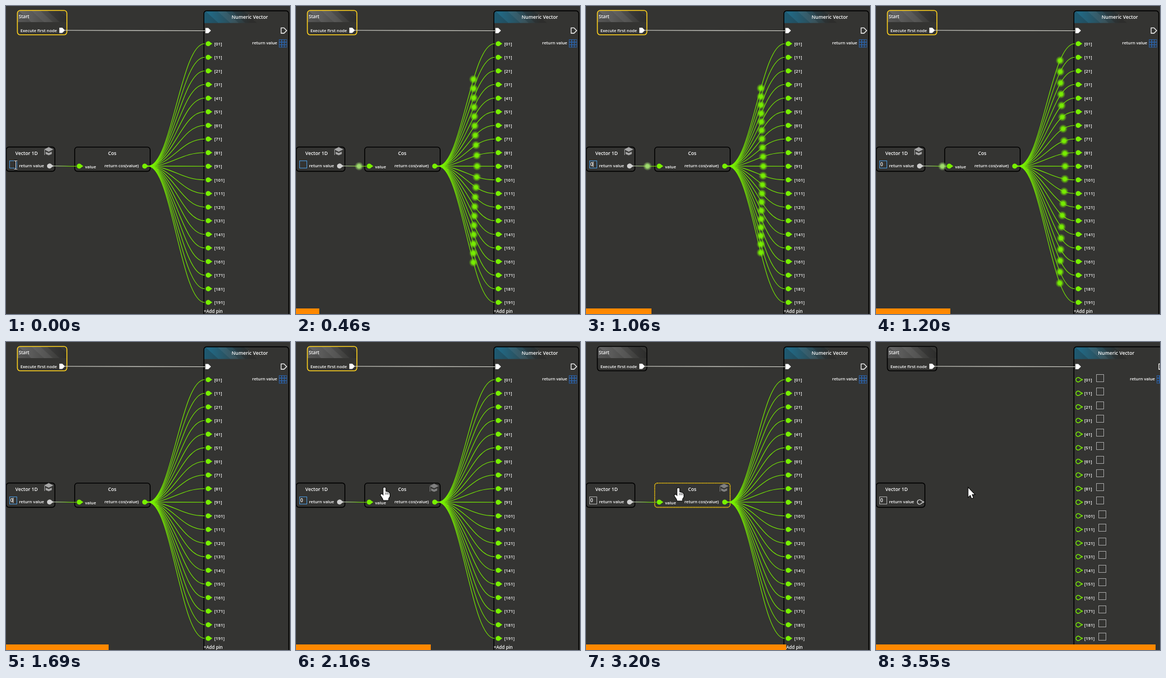
Write an HTML page with a canvas that moves like this. It is 512 by 554 pixels and loops after 3630 ms.

```html
<!DOCTYPE html>
<html lang="en">
<head>
<meta charset="utf-8">
<title>Node graph</title>
<style>
  html, body { margin: 0; width: 100%; height: 100%; overflow: hidden; background: #343432; }
  canvas { display: block; width: 512px; height: 554px; }
</style>
</head>
<body>
<canvas id="stage" width="512" height="554"></canvas>
<script>
const ctx = document.getElementById('stage').getContext('2d');
const LOOP = 3630, BG = '#343432', GREEN = '#78f000', YELLOW = '#ffd21e', WHITE = '#fff';
const ROWS = 20, DELETE_AT = 3240, CLICK_AT = 2600, TYPE_AT = 540;

const KEYS = [[0, 0], [1, 80], [7, 540], [8, 620], [11, 840], [12, 900], [15, 1120], [16, 1200],
  [17, 1280], [22, 1690], [23, 1720], [24, 1800], [29, 2160], [30, 2240], [31, 2300], [32, 2380],
  [39, 2900], [40, 2980], [47, 3490], [48, 3550]];
const ticks = [];
KEYS.forEach(([i, ms], k) => {
  const [j, end] = KEYS[k + 1] || [i + 1, LOOP];
  for (let n = i; n < j; n++) ticks.push(ms + (end - ms) * (n - i) / (j - i));
});

// Wires
const rowY = i => 67.8 + i * 24.49;
function wire(x1, y1, x2, y2) {
  const c = (x2 - x1) * 0.42;
  const d = `M${x1} ${y1}C${x1 + c} ${y1} ${x2 - c} ${y2} ${x2} ${y2}`;
  const el = document.createElementNS('http://www.w3.org/2000/svg', 'path');
  el.setAttribute('d', d);
  const length = el.getTotalLength();
  return { shape: new Path2D(d), at: p => el.getPointAtLength(p * length) };
}
const fan = Array.from({ length: ROWS }, (_, i) => wire(256, 288, 358, rowY(i)));
const feed = wire(84, 287.7, 127, 288.3);
const execWire = wire(106, 43.7, 359, 44.5);
const feedColor = ctx.createLinearGradient(84, 0, 116, 0);
feedColor.addColorStop(0, '#d4d4d4');
feedColor.addColorStop(1, GREEN);

function stroke(shape, color, width = 1.1) {
  ctx.strokeStyle = color;
  ctx.lineWidth = width;
  ctx.stroke(shape);
}

function text(s, x, y, size = 7.6, align = 'left') {
  ctx.font = `600 ${size}px "Open Sans", "Noto Sans", sans-serif`;
  ctx.textAlign = align;
  ctx.fillStyle = WHITE;
  ctx.fillText(s, x, y);
}

const title = (s, x, y) => text(s, x, y, 8.7, 'center');

function poly(points, x = 0, y = 0) {
  const p = new Path2D();
  points.forEach(([a, b]) => p.lineTo(x + a, y + b));
  p.closePath();
  return p;
}

function fill(shape, color) {
  ctx.fillStyle = color;
  ctx.fill(shape);
}

function node(x, y, w, h, border, { header, dotted } = {}) {
  const box = new Path2D();
  box.roundRect(x, y, w, h, 5);
  fill(box, BG);
  if (header) {
    ctx.save();
    ctx.clip(box);
    const { color, reach, height } = header;
    const g = ctx.createLinearGradient(x, 0, x + reach, 0);
    g.addColorStop(0, color);
    g.addColorStop(1, BG);
    ctx.fillStyle = g;
    ctx.fillRect(x, y, reach, height);
    const band = (a, b, shade) =>
      fill(poly([[a, 0], [b, 0], [b + height * 1.1, height], [a + height * 1.1, height]], x, y), shade);
    band(-30, 2, 'rgba(30,30,30,.25)');
    band(reach * 0.28, reach * 0.46, 'rgba(255,255,255,.06)');
    band(reach * 0.6, reach * 0.85, 'rgba(25,25,25,.25)');
    ctx.restore();
  }
  stroke(box, dotted ? '#5a4c12' : border, 1.6);
  if (dotted) {
    ctx.setLineDash([1.4, 1]);
    stroke(box, border, 1.6);
    ctx.setLineDash([]);
  }
}

function pin(x, y, color, hollow) {
  const p = new Path2D();
  p.arc(x, y, hollow ? 4 : 4.5, 0.6, -0.6);
  p.lineTo(x + 7.5, y);
  p.closePath();
  if (hollow) stroke(p, color, 1.5);
  else fill(p, color);
}

function execPin(x, y, hollow) {
  const p = poly([[0, -4.8], [5.2, -4.8], [10, 0], [5.2, 4.8], [0, 4.8]], x, y);
  if (hollow) stroke(p, WHITE, 1.3);
  else fill(p, WHITE);
}

function cap(x, y, color) {
  fill(poly([[-5.5, 1], [0, 3.6], [5.5, 1], [5.5, 5.2], [0, 7.5], [-5.5, 5.2]], x, y), color);
  const top = poly([[-9, -3], [0, -7.5], [9, -3], [0, 1.6]], x, y);
  fill(top, color);
  stroke(top, '#2c2c2c', 0.6);
  ctx.fillStyle = color;
  ctx.fillRect(x - 8, y - 2, 1, 9);
}

function dot({ x, y }, rgb) {
  const g = ctx.createRadialGradient(x, y, 0, x, y, 8);
  [[0, 1], [0.4, 0.95], [0.65, 0.5], [1, 0]].forEach(([at, a]) => g.addColorStop(at, `rgba(${rgb},${a})`));
  ctx.fillStyle = g;
  ctx.fillRect(x - 8, y - 8, 16, 16);
}

// Mouse pointers, relative to their hot spot
const HAND = [[-2, 1], [0, 0], [2, 1], [2, 7.5], [5, 8], [8, 9], [9.5, 11], [9.5, 16], [7, 20],
  [7, 23], [-2, 23], [-3, 20], [-7, 14], [-6, 12], [-4, 12.5], [-2, 15]];
const ARROW = [[0, 0], [0, 16], [3.6, 12.6], [6, 18.5], [8.6, 17.4], [6.2, 11.6], [11, 11.6]];

function pointer(kind, x, y) {
  if (kind === 'beam') {
    const beam = new Path2D(`M${x - 3} ${y - 7.5}h6m-3 0v15m-3 0h6`);
    stroke(beam, '#000', 2.6);
    stroke(beam, '#fff', 1);
    return;
  }
  const p = poly(kind === 'hand' ? HAND : ARROW, x, y);
  stroke(p, '#000', 2);
  fill(p, '#fff');
  if (kind === 'hand') {
    ctx.fillStyle = '#000';
    for (const dx of [2, 4.6, 7.2]) ctx.fillRect(x + dx, y + 9, 0.8, 4);
  }
}

const ease = (t, a, b) => {
  const u = Math.min(1, Math.max(0, (t - a) / (b - a)));
  return u * u * (3 - 2 * u);
};

function mouse(t) {
  const go = ease(t, 1760, 2110), drift = ease(t, 2300, 2600);
  return { x: 17.5 + 142 * go + 7 * drift, y: 286 - 24.5 * go + drift };
}

function startNode(selected) {
  node(20.5, 8, 89.2, 43.8, selected ? YELLOW : '#000',
    { header: { color: '#6a6a6a', reach: 89, height: 21 } });
  text('Start', 23, 22, 8);
  text('Execute first node', 26, 47);
  execPin(96.2, 43.8);
}

function vectorNode(t, focused, linked) {
  node(0.4, 253.6, 87.8, 43.8, '#000');
  title('Vector 1D', 37, 268);
  text('return value', 23.5, 290.2);
  ctx.strokeStyle = focused ? '#4c9be0' : '#b4b4b4';
  ctx.lineWidth = 1;
  ctx.strokeRect(6.5, 278.5, 13, 13);
  if (t >= TYPE_AT) text('0', 7.8, 288.4, 8.6);
  if (focused && t >= TYPE_AT && Math.floor((t - TYPE_AT) / 530) % 2 === 0) {
    ctx.fillStyle = WHITE;
    ctx.fillRect(12.4, 280, 1, 9.5);
  }
  pin(78.5, 287.8, '#cfcfcf', !linked);
}

function cosNode(selected) {
  node(123.8, 253.8, 136, 43.6, selected ? YELLOW : '#000', { dotted: selected });
  title('Cos', 191.5, 268);
  text('value', 142.5, 292);
  text('return cos(value)', 239.5, 290.2, 7.6, 'right');
  pin(132, 288, GREEN);
  pin(250, 288, GREEN);
}

function numericNode(linked) {
  const shift = linked ? 0 : 14;
  node(356.7, 8.6, 153 + shift, 560, '#000',
    { header: { color: '#1f7090', reach: 84, height: 22 } });
  title('Numeric Vector', linked ? 439.5 : 433, 23);
  execPin(359.5, 44.2);
  execPin(496 + shift, 44.2, true);
  text('return value', 489 + shift, 69, 7.6, 'right');
  ctx.strokeStyle = '#2b62a8';
  ctx.lineWidth = 1;
  for (let i = 0; i < 9; i++) {
    ctx.strokeRect(492.5 + shift + i % 3 * 4.7, 60.5 + Math.floor(i / 3) * 4.7, 4.2, 4.2);
  }
  for (let i = 0; i < ROWS; i++) {
    const y = rowY(i);
    pin(364.5, y, GREEN, !linked);
    text(`[${i}1]`, 375.5, y + 3, 7.8);
    if (!linked) {
      ctx.strokeStyle = '#a8a8a8';
      ctx.lineWidth = 1;
      ctx.strokeRect(i < 10 ? 397.5 : 401.5, Math.round(y) - 9.5, 13, 13);
    }
  }
  text('+Add pin', 356.5, 552, 8);
}

function draw(tick) {
  const t = ticks[tick];
  const linked = t < DELETE_AT, clicked = t >= CLICK_AT;
  const m = mouse(t);
  ctx.fillStyle = BG;
  ctx.fillRect(0, 0, 512, 554);

  startNode(!clicked);
  vectorNode(t, !clicked, linked);
  if (linked) cosNode(clicked);
  numericNode(linked);
  stroke(execWire.shape, '#dcdcd4');

  if (linked) {
    stroke(feed.shape, feedColor);
    fan.forEach(w => stroke(w.shape, GREEN));
    // Each edit of the value sends one pulse down every wire
    for (const [begin, span] of [[0, 560], [588, 735]]) {
      const p = (t - begin) / span;
      if (p <= 0 || p >= 1) continue;
      dot(feed.at(p), '160,222,110');
      fan.forEach(w => dot(w.at(p), '120,240,0'));
    }
    if (m.x < 88) cap(77, 261, '#a6a6a6');
    else if (m.x > 124) cap(249, 262, '#808080');
  }

  if (t < 80 || t >= 1800) {
    const overNode = m.x < 88 || (m.x > 124 && linked);
    pointer(m.x < 22 ? 'beam' : overNode ? 'hand' : 'arrow', m.x, m.y);
  }

  const done = tick + (linked ? 0 : 12);
  ctx.fillStyle = '#ff8800';
  ctx.fillRect(0, 544, Math.round(done * 512 / 61), 10);
}

const origin = performance.now();
function play() {
  const t = (performance.now() - origin) % LOOP;
  draw(ticks.findLastIndex(start => start <= t));
  requestAnimationFrame(play);
}
play();
</script>
</body>
</html>
```
